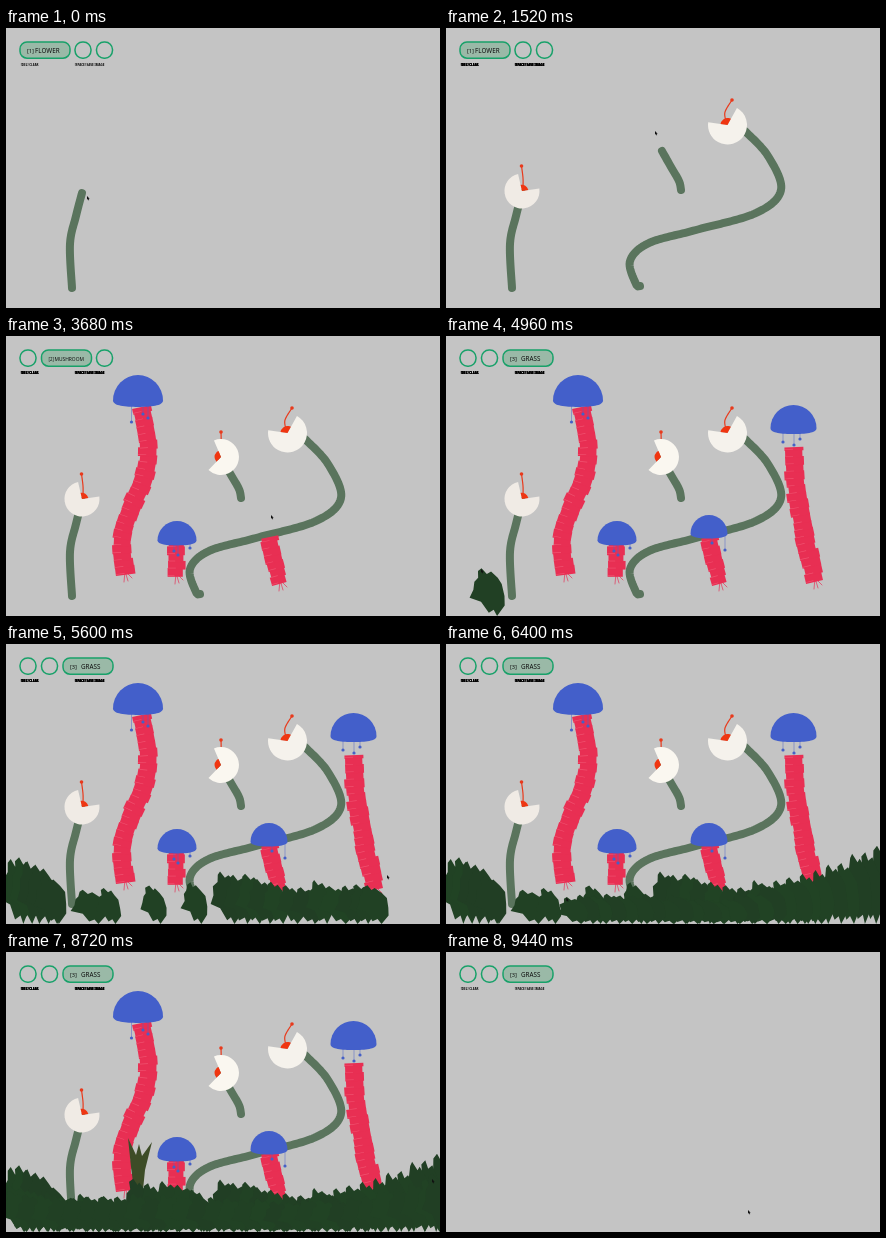
Animation, 434 px wide and 280 px high, one loop 9.52 s. Source, as an HTML page with a canvas:

```html
<!DOCTYPE html>
<html lang="en">
<head>
<meta charset="utf-8">
<title>Drawing a garden</title>
<style>
html, body { margin: 0; width: 100%; height: 100%; overflow: hidden; background: #c4c4c4; }
canvas { display: block; width: 434px; height: 280px; }
</style>
</head>
<body>
<canvas id="stage" width="434" height="280"></canvas>
<script>
const ctx = document.getElementById('stage').getContext('2d');
const LOOP = 9520, STEP = 80, CLEAR = 9280;
const RAD = Math.PI / 180;
const clamp = v => Math.max(0, Math.min(1, v));
const lerp = (a, b, k) => a + (b - a) * k;
const random = seed => { const v = Math.sin(seed * 127.1 + 11.7) * 43758.5453; return v - Math.floor(v); };

// Smooth curve through the points, sampled at an even spacing.
function curve(points, spacing) {
  const out = [points[0]];
  for (let i = 0; i < points.length - 1; i++) {
    const b = points[i], c = points[i + 1], a = points[i - 1] || b, d = points[i + 2] || c;
    for (let k = 1; k <= 60; k++) {
      const u = k / 60;
      const p = [0, 1].map(n => b[n] + .5 * u * (c[n] - a[n] + u * (2 * a[n] - 5 * b[n] + 4 * c[n] - d[n]
        + u * (3 * (b[n] - c[n]) + d[n] - a[n]))));
      const last = out[out.length - 1];
      if (Math.hypot(p[0] - last[0], p[1] - last[1]) >= spacing) out.push(p);
    }
  }
  out.push(points[points.length - 1]);
  return out;
}

function trace(points) {
  ctx.beginPath();
  points.forEach(p => ctx.lineTo(...p));
}
function dot(x, y, r, color) {
  ctx.fillStyle = color;
  ctx.beginPath();
  ctx.arc(x, y, r, 0, 7);
  ctx.fill();
}
function pie(x, y, r, from, to, color) {
  ctx.fillStyle = color;
  ctx.beginPath();
  ctx.moveTo(x, y);
  ctx.arc(x, y, r, from * RAD, to * RAD);
  ctx.fill();
}

function flower(s, t) {
  ctx.lineCap = ctx.lineJoin = 'round';
  ctx.strokeStyle = '#5a745d';
  ctx.lineWidth = 8;
  trace(s.shown);
  ctx.stroke();
  if (t <= s.end) return;
  const { x, y, r, mouth: [from, to], antenna, color } = s.head;
  const grown = curve(antenna, 1);
  const count = Math.ceil(grown.length * clamp((t - s.end) / 240));
  const visible = grown.slice(0, count), tip = visible[count - 1];
  const drawAntenna = () => {
    ctx.strokeStyle = '#e83a1c';
    ctx.lineWidth = 1.2;
    trace(visible);
    ctx.stroke();
    dot(...tip, 1.8, '#e83a1c');
  };
  if (s.head.behind) drawAntenna();
  pie(x, y, r, to, from + 360, color);
  pie(x, y, r * .36, from, to, '#f03510');
  if (!s.head.behind) drawAntenna();
}

function mushroom(s, t) {
  const pts = s.shown, [x0, y0] = pts[0];
  ctx.strokeStyle = '#e5345a';
  ctx.lineWidth = .7;
  for (const [dx, dy] of [[-1, 8], [7, 4], [3, 7]]) {
    trace([[x0, y0 - 3], [x0 + dx, y0 + dy]]);
    ctx.stroke();
  }
  for (let i = 0; i < pts.length - 1; i++) {
    const [x, y] = pts[i], [nx, ny] = pts[i + 1];
    const w = s.width * (.93 + .2 * random(i + x0)), shift = 2 * random(i * 3 + x0) - 1;
    ctx.save();
    ctx.translate(x, y);
    ctx.rotate(Math.atan2(ny - y, nx - x) + Math.PI / 2);
    ctx.fillStyle = '#e82f53';
    ctx.fillRect(shift - w / 2, -Math.hypot(nx - x, ny - y) - .8, w, Math.hypot(nx - x, ny - y) + 1.6);
    ctx.fillStyle = 'rgba(255,150,165,.35)';
    ctx.fillRect(shift - w / 2, -1, w * .45, .6);
    ctx.restore();
  }
  if (t <= s.end) return;
  const { x, top, rx, bottom, threads } = s.cap, edge = lerp(top, bottom, .8), k = clamp((t - s.end) / 240);
  for (const [tx, ty] of threads) {
    const y = lerp(bottom - 4, ty, k);
    ctx.strokeStyle = 'rgba(80,100,200,.55)';
    ctx.lineWidth = .9;
    trace([[tx, bottom - 6], [tx, y]]);
    ctx.stroke();
    dot(tx, y, 1.6, '#4560c6');
  }
  ctx.fillStyle = '#435fca';
  ctx.beginPath();
  ctx.ellipse(x, edge, rx, edge - top, 0, Math.PI, 2 * Math.PI);
  ctx.bezierCurveTo(x + rx, bottom - 1, x + rx * .5, bottom, x, bottom);
  ctx.bezierCurveTo(x - rx * .5, bottom, x - rx, bottom - 1, x - rx, edge);
  ctx.fill();
}

// Leaf outline: x offset from the tip, and height as a share of the leaf.
const LEAF = [[0, 0], [4, .12], [7, .07], [12, .2], [16, .33], [18, .58], [18, .78], [12, 1],
  [9, .87], [5, .93], [0, .7], [-9, .62], [-6, .45], [-6, .28], [-3, .2], [-3, .06]];
function grass(s) {
  s.shown.forEach(([x, y], i) => {
    const seed = i + s.start, tip = y + 5 * random(seed) - 2.5;
    const height = 280 - tip, width = .95 + .35 * random(seed + 3);
    ctx.fillStyle = `rgb(33,${62 + 5 * random(seed + 7)},36)`;
    trace(LEAF.map(([dx, dy], n) => [x + dx * width + 1.5 * random(seed + n), tip + dy * height]));
    ctx.fill();
  });
}

function sprout(s, t) {
  if (t < s.start) return;
  ctx.fillStyle = '#3d4c27';
  trace([[122, 186], [130, 203], [133, 192], [136, 204], [146, 190], [139, 218], [137, 238], [128, 238], [125, 215]]);
  ctx.fill();
}

const strokes = [
  { draw: flower, start: -480, end: 0, points: [[66, 260], [64, 216], [70, 188], [76, 165]],
    head: { x: 76, y: 163, r: 17.5, mouth: [-103, -8], color: '#f0ebe5', antenna: [[77, 160], [77, 150], [75.5, 138]] } },
  { start: 0, end: 0, points: [[81, 168]] },
  { draw: flower, start: 320, end: 880,
    points: [[194, 258], [190, 256], [184, 233], [203, 215], [250, 202], [310, 185], [335, 162], [322, 128], [299, 103]],
    head: { x: 281.5, y: 97, r: 19.5, mouth: [-172, -61], color: '#f5f2ec', antenna: [[280, 93], [279, 84], [286, 72]] } },
  { draw: flower, start: 1280, end: 1520, points: [[235, 162], [233, 153], [225, 139], [216, 123]],
    head: { x: 215, y: 121, r: 18, mouth: [134, 247], color: '#faf7f0', behind: true, antenna: [[213, 118], [215, 106], [215, 96]] } },
  { start: 1520, end: 1520, points: [[209, 103]] },
  { draw: mushroom, start: 2080, end: 2640, width: 18,
    points: [[119, 238], [116, 205], [124, 175], [138, 142], [142, 110], [135, 72]],
    cap: { x: 132, top: 39, rx: 25, bottom: 71, threads: [[125.5, 86], [137, 78], [142, 82]] } },
  { draw: mushroom, start: 2960, end: 3120, width: 16, points: [[170, 240], [170, 224], [170, 207]],
    cap: { x: 171, top: 185, rx: 19.5, bottom: 209.5, threads: [[168, 215], [172, 219], [184, 212]] } },
  { draw: mushroom, start: 3360, end: 3680, width: 16, points: [[274, 247], [268, 225], [263, 202]],
    cap: { x: 263, top: 179, rx: 18.5, bottom: 202.5, threads: [[266, 207], [279, 214]] } },
  { start: 3680, end: 3680, points: [[265, 179]] },
  { draw: mushroom, start: 4000, end: 4480, width: 18, points: [[369, 245], [357, 192], [350, 150], [348, 112]],
    cap: { x: 347.5, top: 69, rx: 23, bottom: 98, threads: [[337, 106], [348, 109], [354, 103]] } },
  { draw: grass, start: 4960, end: 5600,
    points: [[35, 233], [4, 215], [12, 212], [20, 215], [29, 222], [38, 233], [76, 246], [97, 244], [142, 240],
      [183, 236], [214, 230], [227, 233], [239, 232], [250, 234], [264, 237], [279, 241], [294, 243], [308, 238],
      [323, 244], [338, 240], [350, 242], [360, 239]] },
  { start: 5600, end: 5600, points: [[381, 231]] },
  { draw: grass, start: 5760, end: 6640, spacing: 13,
    points: [[430, 201], [405, 212], [375, 225], [330, 238], [280, 253], [220, 252], [160, 250], [100, 254], [50, 243], [4, 235]] },
  { draw: sprout, start: 6880, end: 6880, points: [[133, 188]] },
  { draw: grass, start: 6960, end: 7360, spacing: 15,
    points: [[126, 225], [137, 228], [185, 239], [160, 253], [110, 255], [74, 244]] },
  { start: 7440, end: 7440, points: [[77, 225]] },
  { draw: grass, start: 7760, end: 8640, spacing: 15,
    points: [[4, 240], [60, 246], [130, 242], [210, 246], [300, 248], [370, 240], [426, 222]] },
  { draw: grass, start: 8800, end: 9200, spacing: 17, points: [[426, 232], [370, 247], [300, 254]] },
  { start: 9440, end: 9440, points: [[302, 258]] }
];
for (const s of strokes) {
  const spacing = s.draw === mushroom ? 7 : s.draw === flower ? 2 : s.spacing;
  s.path = spacing ? curve(s.points, spacing) : s.points;
}

function text(value, x, y, font) {
  ctx.font = font;
  ctx.fillText(value, x, y);
}
const MODES = [['[1]', 'FLOWER', 6.3], ['[2]', 'MUSHROOM', 4.9], ['[3]', 'GRASS', 6.3]];
function toolbar(t) {
  const active = t < 2000 ? 0 : t < 4720 ? 1 : 2;
  let x = 14;
  ctx.lineWidth = 1.5;
  ctx.strokeStyle = '#18a169';
  MODES.forEach(([key, name, size], i) => {
    const on = i === active, w = on ? 50 : 16;
    ctx.beginPath();
    ctx.roundRect(x, 14, w, 16.2, on ? 7 : 7.6);
    if (on) { ctx.fillStyle = '#9ab9a7'; ctx.fill(); }
    ctx.stroke();
    if (on) {
      ctx.fillStyle = '#111';
      text(key, x + 7, 24.5, `${size * .9}px "Noto Sans", sans-serif`);
      text(name, x + (i === 1 ? 13 : i === 2 ? 18 : 15), 24.5, `${size}px "Noto Sans", sans-serif`);
    }
    x += w + (on ? 5 : 5.5);
  });
  // Labels are painted over themselves and darken as the drawing goes on.
  const layers = t < 400 || t >= CLEAR ? 1 : 4;
  ctx.fillStyle = '#000';
  for (let i = 0; i < layers; i++) {
    text('[DEL] CLEAR', 14.8, 37.5, 'bold 3px "Noto Sans", sans-serif');
    text('[SPACE] SAVE IMAGE', 68.8, 37.5, 'bold 3px "Noto Sans", sans-serif');
  }
}

function progress(s, t) {
  return s.end > s.start ? clamp((t - s.start) / (s.end - s.start)) : 1;
}
function cursor(t) {
  const i = strokes.findLastIndex(s => s.start <= t), s = strokes[i], next = strokes[i + 1];
  let [x, y] = s.path[Math.round((s.path.length - 1) * progress(s, t))];
  if (t > s.end && next) {
    const k = (t - s.end) / (next.start - s.end);
    x = lerp(x, next.path[0][0], k);
    y = lerp(y, next.path[0][1], k);
  }
  ctx.fillStyle = '#111';
  trace([[x, y], [x, y + 3.8], [x + .9, y + 3], [x + 1.6, y + 4.4], [x + 2.2, y + 4], [x + 1.6, y + 2.8], [x + 2.7, y + 2.7]]);
  ctx.fill();
}

function frame(now) {
  const t = Math.floor(now % LOOP / STEP) * STEP;
  ctx.fillStyle = '#c4c4c4';
  ctx.fillRect(0, 0, 434, 280);
  if (t < CLEAR) {
    for (const s of strokes) {
      if (!s.draw || t < s.start) continue;
      s.shown = s.path.slice(0, 1 + Math.round((s.path.length - 1) * progress(s, t)));
      s.draw(s, t);
    }
  }
  toolbar(t);
  cursor(t);
  requestAnimationFrame(() => frame(performance.now() - began));
}
const began = performance.now();
frame(0);
</script>
</body>
</html>
```
